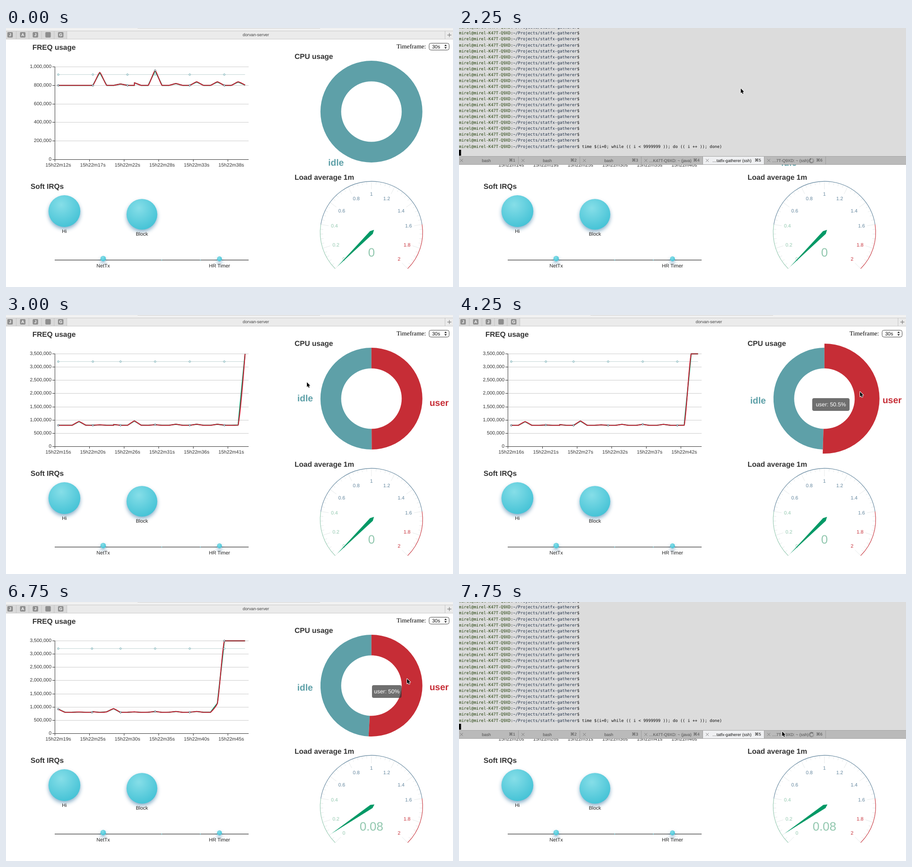
Recreate the animation shown at these times as an HTML page with a canvas. Size 982 by 570 pixels, loop 8 s.

```html
<!DOCTYPE html>
<html lang="en">
<head>
<meta charset="utf-8">
<title>Server monitor</title>
<style>
  html, body { margin: 0; width: 100%; height: 100%; overflow: hidden; background: #fff; }
  canvas { display: block; width: 982px; height: 570px; }
</style>
</head>
<body>
<canvas id="stage"></canvas>
<script>
const W = 982, H = 570, LOOP = 8000, STEP = 250;
const SANS = '"Liberation Sans", Arial, sans-serif';
const MONO = '8.97px "DejaVu Sans Mono", monospace';
const TEAL = '#5ea0a8', RED = '#c62d36', GREEN = '#009966', INK = '#333';
const MINT = '#91c7ae', BLUE = '#63869e';

const canvas = document.getElementById('stage');
const ctx = canvas.getContext('2d');
const dpr = window.devicePixelRatio || 1;
canvas.width = W * dpr;
canvas.height = H * dpr;
// Fractional glyph advances, so that small text keeps its true width.
ctx.textRendering = 'geometricPrecision';

const lerp = (a, b, p) => a + (b - a) * p;
const easeOut = p => 1 - (1 - Math.min(1, p)) ** 3;
const sans = (size, weight = '') => `${weight} ${size}px ${SANS}`;

function text(str, x, y, font, color = INK, align = 'left', base = 'middle') {
  ctx.font = font;
  ctx.fillStyle = color;
  ctx.textAlign = align;
  ctx.textBaseline = base;
  ctx.fillText(str, x, y);
}

function rect(x, y, w, h, color) {
  ctx.fillStyle = color;
  ctx.fillRect(x, y, w, h);
}

function line(x1, y1, x2, y2, color, width = 1) {
  ctx.strokeStyle = color;
  ctx.lineWidth = width;
  ctx.beginPath();
  ctx.moveTo(x1, y1);
  ctx.lineTo(x2, y2);
  ctx.stroke();
}

function disc(x, y, r, fill, stroke) {
  ctx.beginPath();
  ctx.arc(x, y, r, 0, Math.PI * 2);
  ctx.fillStyle = fill;
  ctx.fill();
  if (stroke) {
    ctx.strokeStyle = stroke;
    ctx.lineWidth = 1;
    ctx.stroke();
  }
}

function roundBox(x, y, w, h, r, fill, stroke) {
  ctx.beginPath();
  ctx.roundRect(x, y, w, h, r);
  ctx.fillStyle = fill;
  ctx.fill();
  if (stroke) {
    ctx.strokeStyle = stroke;
    ctx.lineWidth = 1;
    ctx.stroke();
  }
}

// Browser chrome

function browserBar() {
  rect(0, 0, W, 24, '#ebebeb');
  rect(0, 0, W, 6, '#f1f1f1');
  line(289, 0.5, 690, 0.5, '#d2d2d2');
  rect(0, 6, 134, 18, '#dadada');
  line(0, 6.5, W, 6.5, '#c9c9c9');
  line(0, 24.5, W, 24.5, '#c9c9c9');
  ['J', 'A', 'J', '', 'G'].forEach((letter, i) => {
    const x = 9 + i * 27.8;
    roundBox(x - 6, 9, 12, 12, 2, '#8e8e8e');
    text(letter, x, 15.5, sans(9, 'bold'), '#fff', 'center');
    line(x + 13.5, 7, x + 13.5, 24, '#c4c4c4');
  });
  text('dorvan-server', 549, 15.5, sans(9.4), '#444', 'center');
  line(964.5, 7, 964.5, 24, '#c4c4c4');
  line(969.5, 15.5, 978.5, 15.5, '#666');
  line(974, 11, 974, 20, '#666');
}

function timeframe() {
  text('Timeframe:', 858, 41, '13.8px "Liberation Serif", serif', '#000');
  roundBox(929.5, 33.5, 44, 15, 4, '#fff', '#444');
  text('30s', 936, 41.5, sans(11), '#111');
  ctx.fillStyle = '#222';
  for (const s of [-1, 1]) {
    ctx.beginPath();
    ctx.moveTo(963, 41 + s * 1.3);
    ctx.lineTo(968.4, 41 + s * 1.3);
    ctx.lineTo(965.7, 41 + s * 4.8);
    ctx.fill();
  }
}

// Frequency chart: one sample a second, with second 23 sampled twice

const SPIKES = { 6: 940, 9: 815, 12: 828, 15: 960, 18: 820, 21: 838, 24: 838, 27: 838, 28: 803, 30: 808 };
const sample = n => n > 30 ? 3500 : SPIKES[n] || 800;
const second = n => n === 12 ? 23 : 12 + n;
const catX = c => 114.8 + 15.2 * c;
const axisMax = u => u < 3 ? 1000 : 3500;

function samplePos(u, i) {
  const n = u + i;
  return [catX(n < 12 ? i : i - 1), 289.5 - 204 * sample(n) / axisMax(u)];
}

function strokePath(pts, color, width, smooth) {
  ctx.strokeStyle = color;
  ctx.lineWidth = width;
  ctx.lineJoin = 'round';
  ctx.beginPath();
  ctx.moveTo(...pts[0]);
  const gap = (a, b) => Math.hypot(b[0] - a[0], b[1] - a[1]);
  for (let i = 1; i < pts.length; i++) {
    const a = pts[i - 1], b = pts[i];
    if (!smooth) { ctx.lineTo(...b); continue; }
    const handle = (p, prev, next, side) => {
      if (!prev || !next) return p;
      const k = side * smooth * gap(a, b) / (gap(prev, p) + gap(p, next) || 1);
      return [0, 1].map(d => {
        const v = p[d] + (next[d] - prev[d]) * k;
        return Math.max(Math.min(a[d], b[d]), Math.min(Math.max(a[d], b[d]), v));
      });
    };
    ctx.bezierCurveTo(...handle(a, pts[i - 2], b, 1), ...handle(b, a, pts[i + 1], -1), ...b);
  }
  ctx.stroke();
}

function freqChart(u, p) {
  text('FREQ usage', 58, 44, sans(16, 'bold'));
  const max = axisMax(u), ticks = max === 1000 ? 5 : 7;
  for (let k = 0; k <= ticks; k++) {
    const y = Math.round(289 - 204 * k / ticks) + 0.5;
    if (k) line(107, y, 533, y, '#ccc');
    line(102, y, 107, y, INK);
    text((max * 1000 * k / ticks).toLocaleString('en-US'), 100, y, sans(10.7), INK, 'right');
  }
  line(107.5, 85, 107.5, 290, INK);
  line(107, 289.5, 533, 289.5, INK);
  for (let c = 0; c < 28; c += 5) {
    const n = u + c < 12 ? u + c : u + c + 1;
    const x = Math.round(107 + 15.2 * c) + 0.5;
    line(x, 289, x, 294, INK);
    text(`15h22m${second(n)}s`, catX(c), 302, sans(10.7), INK, 'center');
  }

  const pts = Array.from({ length: 29 }, (_, i) => {
    const a = samplePos(u - 1, i), b = samplePos(u, i);
    return [lerp(a[0], b[0], p), lerp(a[1], b[1], p)];
  });
  line(catX(0), 102.5, catX(27), 102.5, '#c3d4d4');
  strokePath(pts, GREEN, 2.4);
  strokePath(pts, '#d01f35', 2, 0.2);
  for (let i = 0; i < 29; i += 5) {
    disc(pts[i][0], 102.5, 1.8, '#fff', TEAL);
    disc(...pts[i], 1.8, '#fff', '#2f4554');
  }
}

// Soft IRQ bubbles

function bubble(x, y, r, label, labelY) {
  const g = ctx.createRadialGradient(x - r * 0.2, y - r * 0.4, 0, x - r * 0.2, y - r * 0.4, r * 2);
  g.addColorStop(0, 'rgb(134,222,232)');
  g.addColorStop(1, 'rgb(44,184,207)');
  ctx.save();
  ctx.shadowColor = 'rgba(25,100,150,0.5)';
  ctx.shadowBlur = 9 * dpr;
  ctx.shadowOffsetY = 4.5 * dpr;
  disc(x, y, r, g);
  ctx.restore();
  text(label, x, labelY, sans(11), '#222', 'center');
}

function softIrqs() {
  text('Soft IRQs', 54, 349.5, sans(16, 'bold'));
  line(107, 510.7, 533, 510.7, INK, 1.2);
  disc(342, 510.7, 0.9, '#52c4d4');
  disc(427, 510.7, 0.9, '#52c4d4');
  bubble(128.3, 403, 35, 'Hi', 448.4);
  bubble(298.6, 410, 33.8, 'Block', 454.2);
  bubble(213.5, 507.5, 6, 'NetTx', 523.8);
  bubble(469, 508, 5.4, 'HR Timer', 523.8);
}

// CPU ring

const userShare = u => [0, 0, 0, 50, 50.5, 51.22, 51, 50, 50][Math.max(0, u)];

function ring(from, to, outer, color) {
  const a = from * Math.PI * 2 - Math.PI / 2, b = to * Math.PI * 2 - Math.PI / 2;
  ctx.beginPath();
  ctx.arc(802.8, 184, outer, a, b);
  ctx.arc(802.8, 184, 66.5, b, a, true);
  ctx.fillStyle = color;
  ctx.fill();
}

function cpuRing(u, p, hover) {
  text('CPU usage', 634, 63.5, sans(16, 'bold'));
  const share = lerp(userShare(u - 1), userShare(u), p) / 100;
  ring(share, 1, 112, TEAL);
  const big = sans(20, 'bold');
  if (u < 3) {
    text('idle', 725, 297, big, TEAL, 'center');
    return;
  }
  ring(0, share, hover ? 121 : 112, RED);
  const q = u === 3 ? p : 1;
  const idleY = u === 3 ? 184 : 189;
  text('idle', lerp(725, 657, q), lerp(297, idleY, q), big, TEAL, 'center');
  text('user', 951.5, u === 3 ? 194 : 188.5, big, RED, 'center');
}

function tooltip(u) {
  const share = userShare(u);
  const [x, w] = share === 50 ? [804, 65] : [776, 82];
  roundBox(x, 183, w, 28, 4, 'rgba(50,50,50,0.7)');
  text(`user: ${share}%`, x + w / 2, 197.5, sans(12.4), '#fff', 'center');
}

// Load gauge, 0 to 2 over 270 degrees

const GX = 802.8, GY = 450, GR = 113;
const gaugeAngle = v => (135 + 135 * v) * Math.PI / 180;

function gauge(u, p) {
  text('Load average 1m', 634, 329.5, sans(16, 'bold'));
  for (let k = 0; k <= 50; k++) {
    const a = gaugeAngle(k / 25), r = GR - (k % 5 ? 7 : 18);
    line(GX + GR * Math.cos(a), GY + GR * Math.sin(a), GX + r * Math.cos(a), GY + r * Math.sin(a), '#e6eaea');
  }
  for (const [from, to, color] of [[0, 0.4, MINT], [0.4, 1.6, BLUE], [1.6, 2, RED]]) {
    ctx.beginPath();
    ctx.arc(GX, GY, GR - 0.4, gaugeAngle(from), gaugeAngle(to));
    ctx.strokeStyle = color;
    ctx.lineWidth = 1.1;
    ctx.stroke();
  }
  for (let k = 0; k <= 10; k++) {
    const a = gaugeAngle(k / 5), c = Math.cos(a), s = Math.sin(a);
    const align = c < -0.4 ? 'left' : c > 0.4 ? 'right' : 'center';
    const base = s < -0.4 ? 'top' : s > 0.4 ? 'bottom' : 'middle';
    const color = k <= 2 ? MINT : k <= 8 ? BLUE : RED;
    text(String(k / 5), GX + 90 * c, GY + 0.5 + 90 * s, sans(10.8), color, align, base);
  }
  const load = u < 5 ? 0 : 0.08;
  const a = gaugeAngle(u === 5 ? load * p : load);
  ctx.save();
  ctx.translate(GX, GY);
  ctx.rotate(a);
  ctx.beginPath();
  ctx.moveTo(-8, 0);
  ctx.lineTo(0, -4.3);
  ctx.lineTo(107, 0);
  ctx.lineTo(0, 4.3);
  ctx.fillStyle = GREEN;
  ctx.fill();
  ctx.restore();
  text(String(load), GX, 495.5, sans(26.6), MINT, 'center');
}

// Terminal

const USER = 'mirel@mirel-K47T-Q9XD', PATH = '~/Projects/statfx-gatherer';
const COMMAND = ' time $(i=0; while (( i < 9999999 )); do (( i ++ )); done)';

function run(parts, y) {
  let x = 0;
  for (const [str, color] of parts) {
    text(str, x, y, MONO, color);
    x += ctx.measureText(str).width;
  }
  return x;
}

function spinner(x, y, t) {
  const head = Math.floor(t / STEP) * 5;
  for (let k = 0; k < 12; k++) {
    const a = k * Math.PI / 6, c = Math.cos(a), s = Math.sin(a);
    const fade = 0.25 + 0.7 * ((k - head % 12 + 12) % 12) / 11;
    line(x + 3 * c, y + 3 * s, x + 6 * c, y + 6 * s, `rgba(50,50,50,${fade})`, 1.2);
  }
}

function tabs(running, t) {
  const names = ['bash', 'bash', 'bash', '…K47T-Q9XD: ~ (java)', '…tatfx-gatherer (ssh)', '…7T-Q9XD: ~ (ssh)'];
  const centers = [60, 194, 329, 464, 599.5, 728];
  rect(0, 282, W, 19, '#bababa');
  line(0, 282.5, W, 282.5, '#a2a2a2');
  names.forEach((name, i) => {
    const x = i * 135 - 4, active = i === 4;
    if (active) rect(x, 283, 134, 17, '#eff0f2');
    line(x + 134.5, 283, x + 134.5, 300, '#9d9d9d');
    const color = active ? '#111' : '#4c4c4c';
    line(x + 6.5, 288.5, x + 12.5, 294.5, '#777');
    line(x + 12.5, 288.5, x + 6.5, 294.5, '#777');
    text(name, centers[i], 292, sans(9.1), color, 'center');
    text('⌘' + (i + 1), x + 120.5, 292, '9px "Liberation Sans", "DejaVu Sans", sans-serif', color, 'center');
  });
  if (running) spinner(774.5, 292, t);
  else disc(775.5, 292, 3.8, '#4b70a9');
  line(0, 300.5, W, 300.5, '#a2a2a2');
}

function terminal(running, t) {
  rect(0, 0, W, 283, '#dcdcdc');
  const rowY = r => 12 + 13.12 * r;
  const prompt = [[USER, '#1f3d06'], [':', '#111'], [PATH, '#1d2e47'], ['$', '#111']];
  const last = running ? 19 : 20;
  for (let r = -1; r < last; r++) run(prompt, rowY(r));
  const end = run([...prompt, [COMMAND, '#0c0c0c']], rowY(last));
  rect(running ? 0 : end, 268, running ? 4.5 : 5.4, 13, '#000');
  tabs(running, t);
}

// Pointer

const TRAIL = [[2000, 612, 128], [2250, 619, 133], [3000, 661, 148], [3500, 760, 160],
  [4000, 870, 166], [4250, 881, 169], [7000, 881, 169], [7750, 710, 285]];

function pointer(t) {
  if (t < TRAIL[0][0]) return;
  const i = Math.max(1, TRAIL.findIndex(k => k[0] >= t));
  const [t0, x0, y0] = TRAIL[i - 1], [t1, x1, y1] = TRAIL[i];
  const p = (t - t0) / (t1 - t0);
  ctx.save();
  ctx.translate(lerp(x0, x1, p), lerp(y0, y1, p));
  ctx.beginPath();
  for (const [x, y] of [[0, 0], [0, 10.5], [2.4, 8.3], [4, 12], [5.8, 11.2], [4.2, 7.6], [7.4, 7.4]]) ctx.lineTo(x, y);
  ctx.closePath();
  ctx.lineJoin = 'round';
  ctx.strokeStyle = '#fff';
  ctx.lineWidth = 1.8;
  ctx.stroke();
  ctx.fillStyle = '#000';
  ctx.fill();
  ctx.restore();
}

function draw(time) {
  const t = Math.floor(time % LOOP / STEP) * STEP;
  const clock = t + 263;
  const u = Math.floor(clock / 1000);
  const p = easeOut(clock % 1000 / 300);

  ctx.setTransform(dpr, 0, 0, dpr, 0, 0);
  rect(0, 0, W, H, '#fff');
  browserBar();
  timeframe();
  freqChart(u, p);
  softIrqs();
  cpuRing(u, p, t >= 4000 && t < 4750);
  gauge(u, p);
  if (t >= 4250 && t < 7250) tooltip(u);
  if ((t >= 250 && t < 2750) || t >= 7250) terminal(t >= 1000, t);
  pointer(t);
}

const start = performance.now();
function tick() {
  draw(performance.now() - start);
  requestAnimationFrame(tick);
}
tick();
</script>
</body>
</html>
```
